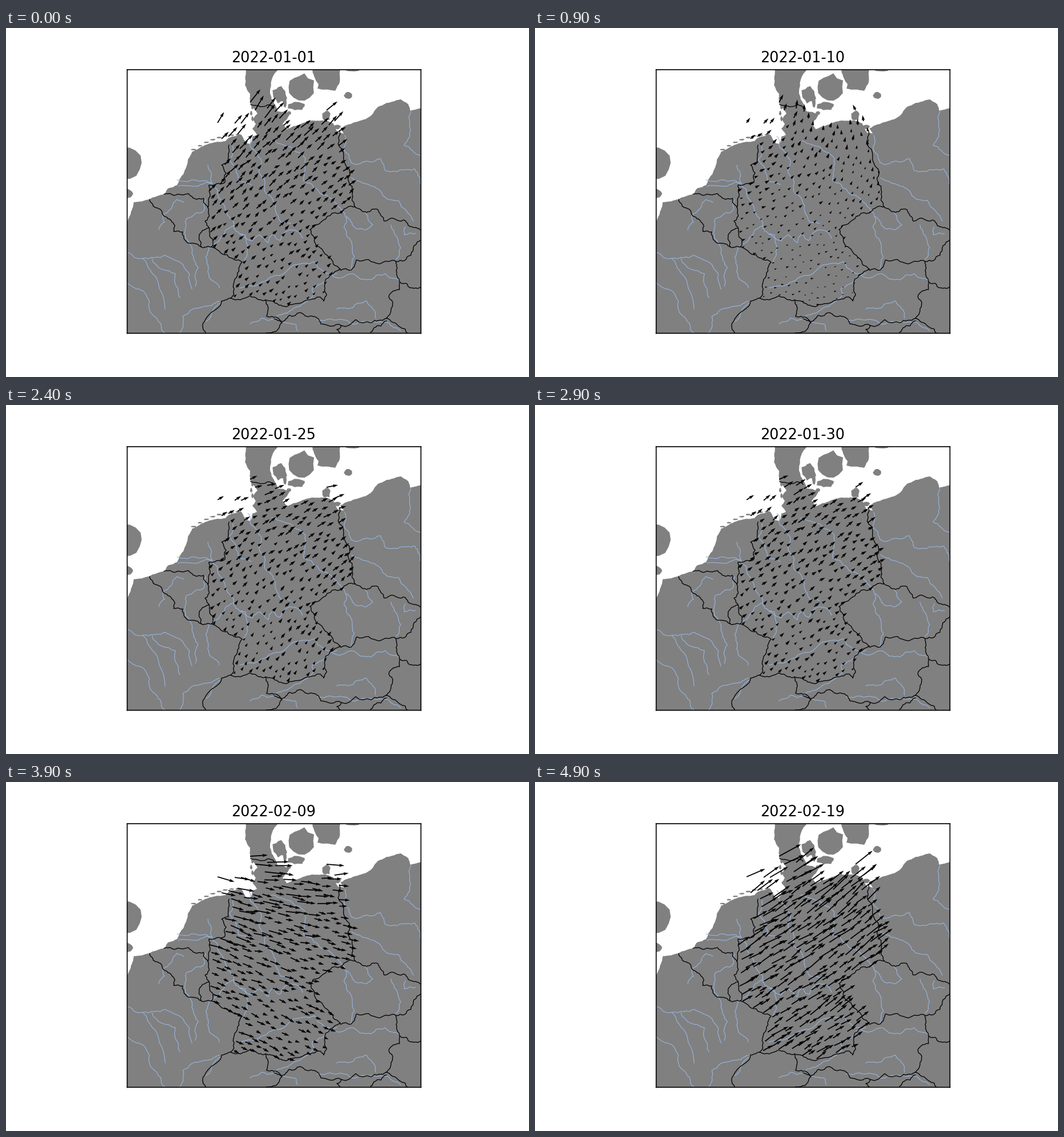
Animation, 917 px wide and 611 px high, one loop 5000 ms. Source, as a matplotlib script:

```python
import numpy as np
import matplotlib.pyplot as plt
from matplotlib.animation import FuncAnimation
from matplotlib.path import Path

WIDTH, HEIGHT, DAYS = 917, 611, 50
LEFT, RIGHT, TOP, BOTTOM = 212.5, 727.5, 73, 534.5
GREY, WATER = "#808080", "#97b6e1"

rng = np.random.default_rng(7)
# At 72 dpi one point is one pixel.
fig = plt.figure(figsize=((WIDTH + .01) / 72, (HEIGHT + .01) / 72), dpi=72,
                 facecolor="white")
ax = fig.add_axes([LEFT / WIDTH, 1 - BOTTOM / HEIGHT,
                   (RIGHT - LEFT) / WIDTH, (BOTTOM - TOP) / HEIGHT])
ax.set(xlim=(LEFT, RIGHT), ylim=(BOTTOM, TOP), xticks=[], yticks=[])
for spine in ax.spines.values():
    spine.set(linewidth=1.7, zorder=5, snap=False)
title = ax.set_title("", fontsize=25.5, pad=12.7, x=.4985)


def pairs(*values):
    return np.array(values, float).reshape(-1, 2)


def rough(points, amount, levels=3):
    """Roughen a polyline by shifting the middle of each segment sideways."""
    for _ in range(levels):
        a, b = points[:-1], points[1:]
        normal = (b - a)[:, ::-1] * [-1, 1]
        shift = rng.uniform(-amount, amount, (len(a), 1))
        finer = np.empty((2 * len(a) + 1, 2))
        finer[::2], finer[1::2] = points, (a + b) / 2 + normal * shift
        points = finer
    return points


def land(points):
    ax.fill(*points.T, color=GREY, lw=0, zorder=1)


def island(x, y, rx, ry, jag=.2):
    angle = np.linspace(0, 2 * np.pi, 14, endpoint=False)
    radius = rng.uniform(1 - jag, 1 + jag, (14, 1))
    land((x, y) + radius * np.c_[rx * np.cos(angle), ry * np.sin(angle)])


def river(*values):
    ax.plot(*rough(pairs(*values), .15).T, color=WATER, lw=1.1, zorder=2)


def border(*values):
    line = rough(pairs(*values), .17)
    ax.plot(*line.T, color="black", lw=1.3, zorder=3)
    return line


# Mainland
coast = rough(pairs(
    211, 343, 219, 322, 224, 305, 252, 300, 278, 291, 284, 281, 300, 275,
    311, 256, 319, 230, 326, 217, 338, 211, 357, 202, 385, 198, 391, 192,
    413, 187, 420, 201, 428, 203, 432, 190, 440, 187, 432, 176, 438, 168,
    433, 159, 441, 150, 429, 134, 428, 115, 419, 100, 420, 70), .07)
baltic = rough(pairs(
    478, 70, 466, 90, 463, 115, 470, 132, 476, 146, 497, 151, 485, 168,
    492, 177, 515, 169, 537, 162, 556, 162, 574, 167, 582, 183, 592, 185,
    586, 176, 605, 168, 622, 162, 638, 155, 652, 138, 668, 131, 692, 125,
    705, 133, 709, 145, 728, 140), .07)
land(np.vstack([coast, baltic, pairs(728, 536, 211, 536)]))

# Islands
island(211, 236, 27, 28, .04)
island(211, 290, 12, 8, .08)
island(480, 116, 12, 14)
island(518, 103, 21, 22)
island(509, 137, 14, 7)
island(489, 131, 3, 8)
island(600, 118, 7, 6, .1)
island(562, 154, 7, 8, .3)
island(496, 149, 4, 3)
island(581, 173, 6, 4)
land(rough(pairs(537, 70, 548, 98, 546, 106, 577, 110, 584, 98, 586, 70), .08))
island(608, 74, 12, 2)
for step in np.linspace(0, 1, 8):
    island(329 + 78 * step, 187 + 26 * (1 - step) ** 2, 4.5, 1.3)
for step in range(4):
    island(430 + 2 * (step % 2), 129 + 10 * step, 2, 4)

# Borders
west = border(391, 205, 390, 236, 378, 240, 386, 254, 383, 271, 356, 275,
              357, 288, 354, 314, 356, 330, 349, 338, 356, 350, 363, 372,
              360, 383, 388, 397, 414, 410, 401, 440, 394, 473)
south = border(394, 473, 427, 469, 449, 477, 470, 480, 487, 487, 515, 482,
               550, 471, 557, 478, 562, 466, 559, 450, 586, 422)
east = border(586, 422, 570, 404, 551, 385, 540, 366, 533, 353, 549, 343,
              582, 325, 597, 315, 612, 313, 607, 290, 600, 266, 603, 256,
              592, 224, 585, 180)
border(252, 300, 258, 312, 271, 318, 284, 334, 296, 347, 294, 356, 310, 357,
       316, 374, 342, 383, 360, 383)
border(342, 383, 343, 357, 356, 350)
border(277, 291, 295, 293, 320, 290, 334, 300, 346, 298, 354, 314)
border(612, 313, 632, 323, 652, 318, 663, 338, 697, 336, 708, 347, 728, 354)
border(586, 424, 605, 424, 615, 406, 655, 413, 684, 409, 685, 430, 690, 445,
       690, 458, 672, 467, 675, 495, 667, 508)
border(684, 409, 710, 398, 728, 370)
border(691, 445, 710, 455, 728, 453)
border(667, 508, 640, 516, 588, 521, 552, 518, 535, 504, 497, 503, 484, 514,
       470, 509)
border(455, 476, 460, 490, 457, 505, 474, 506, 484, 516, 475, 530, 456, 534)
border(394, 473, 378, 478, 357, 501, 345, 524, 350, 536)
border(588, 521, 580, 528, 588, 536)
border(667, 508, 690, 523, 707, 536)
border(667, 513, 645, 525, 638, 536)
border(429, 134, 446, 138, 470, 139)

# Rivers
river(300, 266, 350, 267, 371, 284, 383, 311, 399, 340, 403, 356, 420, 362,
      424, 385, 417, 410)
river(400, 346, 377, 366, 355, 390, 352, 412, 359, 440, 374, 455)
river(302, 277, 330, 277, 360, 271)
river(354, 240, 362, 272)
river(350, 300, 348, 318, 316, 334, 313, 358, 326, 395, 337, 420, 332, 452)
river(312, 305, 300, 300, 275, 328, 278, 340, 268, 353)
river(410, 361, 432, 373, 445, 362, 460, 376, 468, 360, 480, 372, 490, 357,
      512, 356, 520, 368)
river(398, 207, 392, 230, 408, 268, 430, 274)
river(424, 190, 430, 210, 448, 234, 443, 250, 453, 264, 453, 285, 473, 322,
      482, 340, 499, 342)
river(465, 198, 494, 207, 525, 228, 522, 268, 547, 284, 583, 313, 597, 333,
      593, 350, 606, 375, 604, 425)
river(597, 330, 607, 345, 632, 353, 643, 345, 630, 323)
river(594, 188, 594, 215, 605, 236, 632, 233, 657, 229, 666, 250, 693, 248,
      717, 247, 728, 275)
river(606, 262, 632, 273, 661, 294, 688, 302, 714, 338)
river(710, 146, 708, 190, 698, 205, 728, 223)
river(410, 455, 440, 450, 465, 436, 520, 412, 540, 409, 580, 437, 606, 430,
      640, 441, 665, 430, 690, 441)
river(580, 430, 555, 447, 537, 455, 540, 467, 505, 490, 470, 510, 428, 518)
river(546, 511, 592, 511, 636, 514, 664, 515, 692, 530)
river(580, 492, 607, 490, 632, 478, 648, 508)
river(486, 515, 508, 519, 511, 530)
river(675, 345, 692, 385, 684, 405)
river(700, 348, 698, 362, 718, 360)
river(213, 393, 240, 403, 280, 398, 305, 410, 326, 457)
river(240, 404, 262, 435, 279, 492)
river(256, 404, 297, 430, 305, 472)
river(213, 446, 235, 458, 258, 503, 279, 534)
river(304, 534, 310, 505, 345, 488, 374, 478)
river(375, 482, 360, 500, 350, 514)

# Weather stations: a few at sea, the others spread evenly over the country
shore = pairs(574, 170, 537, 165, 492, 180, 474, 143, 432, 137, 441, 160, 436, 192)
country = Path(np.vstack([west, south, east, shore]))
sites = list(pairs(371, 166, 401, 167, 378, 194, 390, 190, 406, 186, 412, 167,
                   428, 130, 562, 144, 576, 163))
for spot in rng.uniform((350, 135), (615, 487), (3000, 2)):
    gap = np.hypot(*(np.array(sites) - spot).T).min()
    if gap > 11.5 and country.contains_point(spot):
        sites.append(spot)
x, y = np.array(sites).T
exposure = rng.uniform(.65, 1.15, len(x))
exposure[:9] = 1

# Key days: length and angle in the north, length and angle in the south,
# then length factor and turn towards the east
key_days = [0, 9, 16, 24, 35, 44, 49]
key_winds = np.array([[28, 58, 8, 40, .85, -14],
                      [14, 55, 4, 15, .9, 60],
                      [31, -20, 17, 28, 1.1, 20],
                      [15, 22, 7, 55, 1.3, -8],
                      [35, 50, 14, 25, .85, -6],
                      [32, 62, 12, 55, .65, 38],
                      [38, 30, 22, 32, 1, 10]])
southward = np.sqrt(np.clip((y - 150) / 320, 0, 1))
eastward = np.clip((x - 390) / 190, 0, 1)


def wind(day):
    """Blend the key days, with larger random swings halfway between them."""
    noise = np.random.default_rng(day)
    progress = np.interp(day, key_days, range(len(key_days))) % 1
    swing = np.sin(np.pi * progress)
    n_size, n_angle, s_size, s_angle, factor, turn = (
        np.interp(day, key_days, column) for column in key_winds.T)
    size = n_size + (s_size - n_size) * southward
    size *= 1 + (factor - 1) * eastward
    size *= 1 + swing * noise.uniform(-.3, .4)
    size *= exposure * noise.uniform(.85, 1.15, len(x))
    angle = n_angle + (s_angle - n_angle) * southward
    angle += turn * eastward * (1 - southward ** 2)
    angle += swing * noise.normal(-15, 30) + noise.normal(0, 5, len(x))
    angle = np.radians(angle)
    return size * np.cos(angle), -size * np.sin(angle)


arrows = ax.quiver(x, y, *wind(0), color="black", angles="xy", scale_units="xy",
                   scale=1, units="dots", width=1.8, zorder=4)


def update(day):
    month, date = (1, day + 1) if day < 31 else (2, day - 30)
    title.set_text(f"2022-{month:02d}-{date:02d}")
    arrows.set_UVC(*wind(day))
    return arrows, title


animation = FuncAnimation(fig, update, frames=DAYS, interval=100, repeat=True)
plt.show()
```
